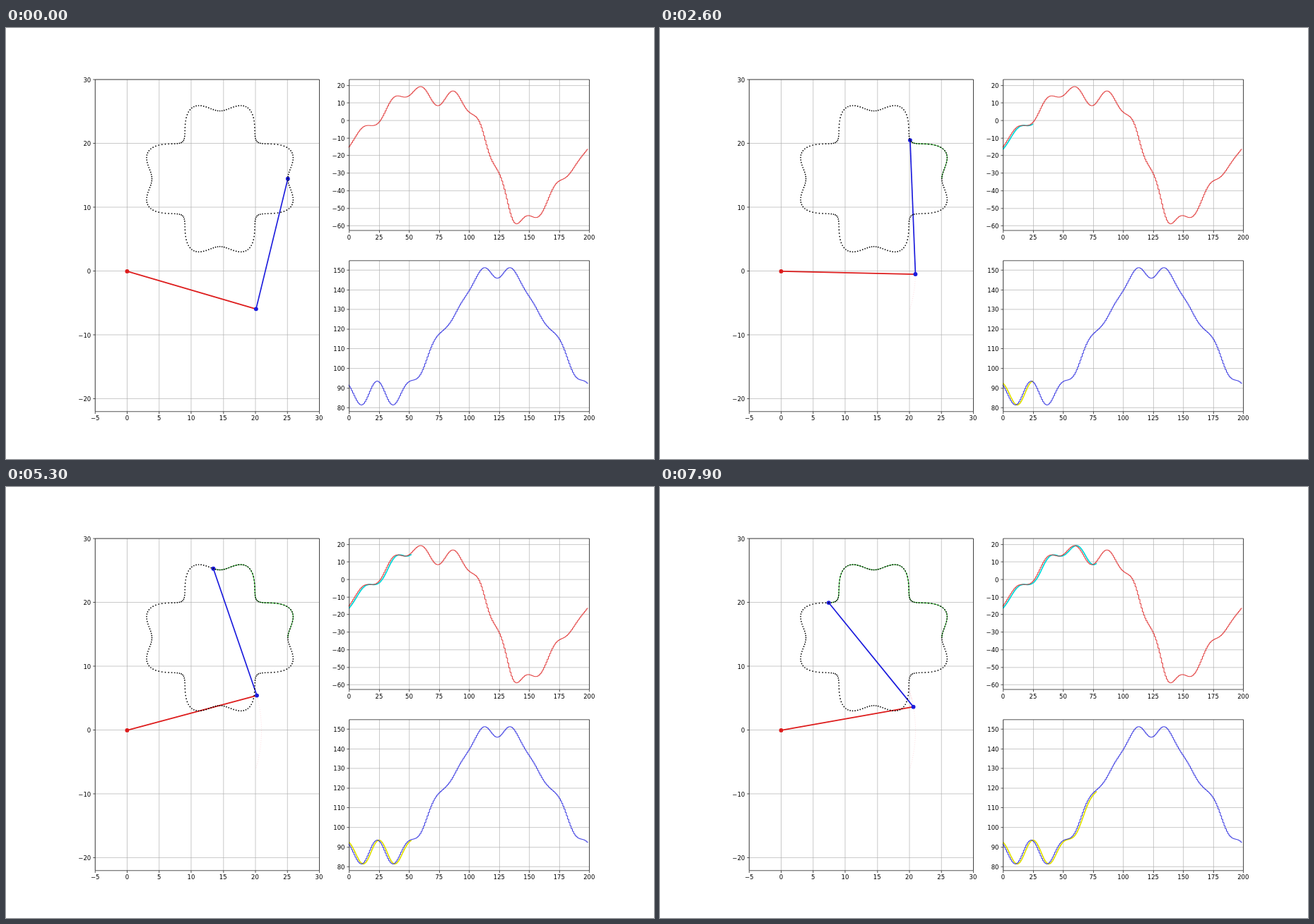
An HTML page with a canvas that plays this animation: 917 px wide and 611 px high, repeating every 8 s.

```html
<!DOCTYPE html>
<html lang="en">
<head>
<meta charset="utf-8">
<title>Two-link arm</title>
<style>
  html, body { margin: 0; width: 100%; height: 100%; overflow: hidden; background: #fff; }
  canvas { display: block; }
</style>
</head>
<body>
<canvas id="stage" width="917" height="611"></canvas>
<script>
const ctx = document.getElementById('stage').getContext('2d');
const RED = '#dd1c1c', BLUE = '#1c1cdd';
const LINK = 21, COUNT = 200, STEP_MS = 100, LOOP_MS = 8000;

// The figure is laid out at 1500 x 1000 and scaled to the stage
const WIDTH = 1500, HEIGHT = 1000, PT = 100 / 72;
ctx.scale(917 / WIDTH, 917 / WIDTH);

const range = (from, to, step) =>
  Array.from({ length: Math.round((to - from) / step) + 1 }, (_, i) => from + i * step);

// Rounded cross in polar form, solved for both joints
const poses = range(0, COUNT - 1, 1).map(i => {
  const a = i * 2 * Math.PI / COUNT;
  const r = 10.64 + 1.2 * Math.cos(4 * a) - 1.215 * Math.cos(8 * a);
  const x = 14.5 + r * Math.cos(a), y = 14.5 + r * Math.sin(a);
  const bend = Math.acos(Math.hypot(x, y) / (2 * LINK));
  const base = Math.atan2(y, x) - bend;
  const deg = 180 / Math.PI;
  return { tip: [x, y], joint: [LINK * Math.cos(base), LINK * Math.sin(base)],
    base: [i, base * deg], bend: [i, 2 * bend * deg] };
});
const series = key => poses.map(p => p[key]);
const tips = series('tip'), joints = series('joint');
const bases = series('base'), bends = series('bend');

// The planned angles lead the recorded ones by one sample
const lead = pts => pts.map(([x], i) => [x, pts[(i + 1) % COUNT][1]]);
const stepped = pts => pts.flatMap((p, i) => i ? [[pts[i - 1][0], p[1]], p] : [p]);
const basePlan = stepped(lead(bases)), bendPlan = stepped(lead(bends));

function makePlot([l, r, t, b], [xMin, xMax], [yMin, yMax], xs, ys) {
  return { l, r, t, b, xs, ys,
    px: x => l + (x - xMin) / (xMax - xMin) * (r - l),
    py: y => b - (y - yMin) / (yMax - yMin) * (b - t) };
}

function padded(pts) {
  const ys = pts.map(p => p[1]);
  const lo = Math.min(...ys), hi = Math.max(...ys), pad = (hi - lo) * 0.05;
  return [lo - pad, hi + pad];
}

const arm = makePlot([206.36, 724.62, 120, 890], [-5, 30], [-22, 30],
  range(-5, 30, 5), range(-20, 30, 10));
const shoulder = makePlot([794.02, 1350, 120, 470], [0, 200], padded(basePlan),
  range(0, 200, 25), range(-60, 20, 10));
const elbow = makePlot([794.02, 1350, 540, 890], [0, 200], padded(bendPlan),
  range(0, 200, 25), range(80, 150, 10));
const plots = [arm, shoulder, elbow];

const snapX = v => Math.round(v) + 0.5;
const snapY = v => Math.round(v) - 0.5;

function line(plot, pts, color, points, dash = []) {
  ctx.beginPath();
  for (const [x, y] of pts) ctx.lineTo(plot.px(x), plot.py(y));
  ctx.strokeStyle = color;
  ctx.lineWidth = points * PT;
  ctx.setLineDash(dash);
  ctx.stroke();
  ctx.setLineDash([]);
}

function dot(plot, [x, y], radius, color) {
  ctx.beginPath();
  ctx.arc(plot.px(x), plot.py(y), radius, 0, 2 * Math.PI);
  ctx.fillStyle = color;
  ctx.fill();
}

function segment(x1, y1, x2, y2, color) {
  ctx.beginPath();
  ctx.moveTo(x1, y1);
  ctx.lineTo(x2, y2);
  ctx.strokeStyle = color;
  ctx.lineWidth = 0.8 * PT;
  ctx.stroke();
}

function grid(p) {
  for (const v of p.xs) segment(snapX(p.px(v)), p.t, snapX(p.px(v)), p.b, '#b0b0b0');
  for (const v of p.ys) segment(p.l, snapY(p.py(v)), p.r, snapY(p.py(v)), '#b0b0b0');
}

function frame(p) {
  const tick = 3.5 * PT, gap = 7 * PT;
  const l = snapX(p.l), t = snapY(p.t);
  ctx.strokeStyle = '#000';
  ctx.lineWidth = 0.8 * PT;
  ctx.strokeRect(l, t, snapX(p.r) - l, snapY(p.b) - t);
  ctx.font = `${10 * PT}px "DejaVu Sans", sans-serif`;
  ctx.fillStyle = '#000';
  const label = v => String(v).replace('-', '\u2212');
  ctx.textAlign = 'center';
  for (const v of p.xs) {
    const x = p.px(v);
    segment(snapX(x), p.b, snapX(x), p.b + tick, '#000');
    ctx.fillText(label(v), x, p.b + gap + 10.4);
  }
  ctx.textAlign = 'right';
  for (const v of p.ys) {
    const y = p.py(v);
    segment(p.l - tick, snapY(y), p.l, snapY(y), '#000');
    ctx.fillText(label(v), p.l - gap, y + 5.2);
  }
}

function draw(n) {
  const past = list => list.slice(0, n);
  ctx.fillStyle = '#fff';
  ctx.fillRect(0, 0, WIDTH, HEIGHT);
  ctx.lineJoin = 'round';
  plots.forEach(grid);

  line(arm, past(joints), 'rgba(255,110,130,.4)', 0.7, [1.6, 3.3]);
  line(arm, past(tips), '#00b400', 1);
  line(arm, [[0, 0], joints[n]], RED, 2);
  dot(arm, [0, 0], 4.8, RED);
  line(arm, [joints[n], tips[n]], BLUE, 2);
  dot(arm, joints[n], 4.8, BLUE);
  dot(arm, tips[n], 4.8, BLUE);
  for (const p of tips) dot(arm, p, 1.4, '#000');

  line(shoulder, past(bases), '#00d8d8', 2);
  line(shoulder, basePlan, RED, 1);
  line(elbow, past(bends), '#e0e000', 2);
  line(elbow, bendPlan, BLUE, 1);

  plots.forEach(frame);
}

const start = performance.now();
function tick() {
  const time = (performance.now() - start) % LOOP_MS;
  draw(Math.floor(time / STEP_MS));
  requestAnimationFrame(tick);
}
tick();
</script>
</body>
</html>
```
